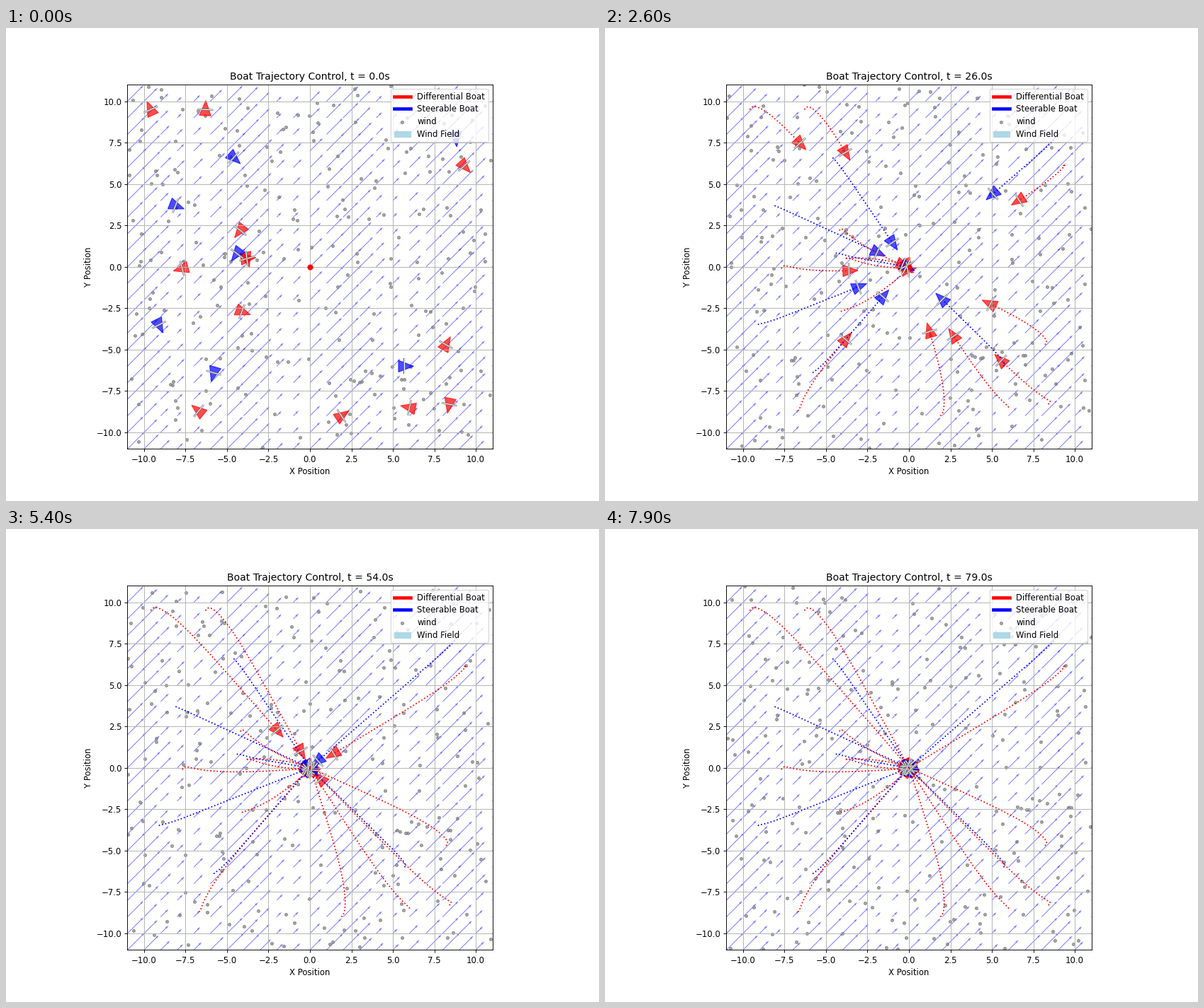
Recreate the animation shown at these times as a matplotlib script. Size 837 by 669 pixels, loop 8 s.

```python
import numpy as np
import matplotlib.pyplot as plt
from matplotlib.animation import FuncAnimation
from matplotlib.lines import Line2D
from matplotlib.patches import Patch, Polygon

FRAMES, INTERVAL, DPI = 80, 100, 83.7
LIMIT = 11
CRUISE = 0.25
DRIFT = np.array([0.0235, 0.0235])
HULL = np.array([[0.55, 0], [-0.36, 0.35], [-0.36, -0.35]])
BEAM = np.array([[0, -0.47], [0, 0.47]])

# Starting points, ordered so that the first headings are evenly spread.
DIFFERENTIAL = [
    (-4.2, 2.2), (8.4, -8.3), (-3.8, 0.5), (9.3, 6.1), (-4.1, -2.7),
    (-3.8, 0.5), (1.9, -9.0), (8.2, -4.7), (-6.3, 9.5), (-9.6, 9.5),
    (-6.7, -8.7), (6.0, -8.5), (-7.7, -0.1),
]
STEERABLE = [
    (-4.4, 0.8), (-5.8, -6.4), (8.8, 7.8), (-9.1, -3.5), (-4.6, 6.6),
    (-8.1, 3.7), (5.7, -6.0),
]


def simulate(start, heading, turn):
    """Turn towards the origin, then sail straight in; one pose per frame."""
    pos, angle, held = np.array(start), np.radians(heading), 0
    poses = []
    for _ in range(FRAMES):
        poses.append((*pos, angle))
        distance = np.hypot(*pos)
        if held or distance < 0.2:
            held += 1
            angle += 0.35 * np.sin(0.9 * held + start[0])
            continue
        error = np.arctan2(-pos[1], -pos[0]) - angle
        error = (error + np.pi) % (2 * np.pi) - np.pi
        angle += turn * error
        ahead = np.array([np.cos(angle), np.sin(angle)])
        thrust = max(np.cos(error), 0) ** 8
        speed = min(CRUISE + DRIFT @ ahead, 0.6 * distance)
        pos = pos + thrust * speed * ahead + (1 - thrust) * DRIFT
    return np.array(poses)


def place(shape, x, y, angle):
    c, s = np.cos(angle), np.sin(angle)
    return shape @ np.array([[c, s], [-s, c]]) + (x, y)


class Boat:
    def __init__(self, ax, poses, color, order):
        self.poses = poses
        self.trail, = ax.plot([], [], ":", color=color, lw=1.5)
        self.hull = Polygon(HULL, closed=True, color=color, alpha=0.7)
        ax.add_patch(self.hull)
        z = 3 + order / 100
        self.beams = [
            ax.plot([], [], color=shade, lw=width, zorder=z + step,
                    solid_capstyle="butt")[0]
            for shade, width, step in (("dimgray", 2.1, 0), ("white", 0.9, 0.005))
        ]

    def show(self, frame):
        pose = self.poses[frame]
        self.trail.set_data(*self.poses[:frame + 1, :2].T)
        self.hull.set_xy(place(HULL, *pose))
        for beam in self.beams:
            beam.set_data(*place(BEAM, *pose).T)


def launch(ax, starts, headings, turn, color, first):
    return [Boat(ax, simulate(start, heading, turn), color, first + i)
            for i, (start, heading) in enumerate(zip(starts, headings))]


fig, ax = plt.subplots(figsize=(837.001 / DPI, 669.001 / DPI), dpi=DPI)
ax.set_xlim(-LIMIT, LIMIT)
ax.set_ylim(-LIMIT, LIMIT)
ax.set_aspect("equal")
ax.set_xlabel("X Position")
ax.set_ylabel("Y Position")
ax.grid(True)
title = ax.set_title("")

# Wind always blows north-east; its strength ripples over the field.
gx, gy = np.meshgrid(np.arange(-11, 12), np.arange(-11, 12))
strength = 0.7 + 0.35 * np.sin(gx) + 0.1 * np.cos(gy)
ax.quiver(gx, gy, strength, strength, color="blue", alpha=0.5, width=0.002,
          angles="xy", scale_units="xy", scale=1)

rng = np.random.default_rng(7)
specks = rng.uniform(-LIMIT, LIMIT, (220, 2))
wind = ax.scatter(*specks.T, s=12, color="gray", alpha=0.7, label="wind")
ax.plot(0, 0, "ro")

boats = launch(ax, DIFFERENTIAL, np.linspace(-128, 195, len(DIFFERENTIAL)),
               0.17, "red", 0)
boats += launch(ax, STEERABLE, np.linspace(-127, 0, len(STEERABLE)),
                0.4, "blue", len(boats))

ax.legend(handles=[
    Line2D([], [], color="red", lw=4, label="Differential Boat"),
    Line2D([], [], color="blue", lw=4, label="Steerable Boat"),
    wind,
    Patch(color="lightblue", label="Wind Field"),
], loc="upper right", labelspacing=0.4)


def update(frame):
    title.set_text(f"Boat Trajectory Control, t = {frame:.1f}s")
    moved = specks + frame * np.array([0.052, 0.056])
    wind.set_offsets((moved + LIMIT) % (2 * LIMIT) - LIMIT)
    for boat in boats:
        boat.show(frame)
    return []


anim = FuncAnimation(fig, update, frames=FRAMES, interval=INTERVAL,
                     init_func=lambda: update(0), repeat=True, repeat_delay=0)
plt.show()
```
